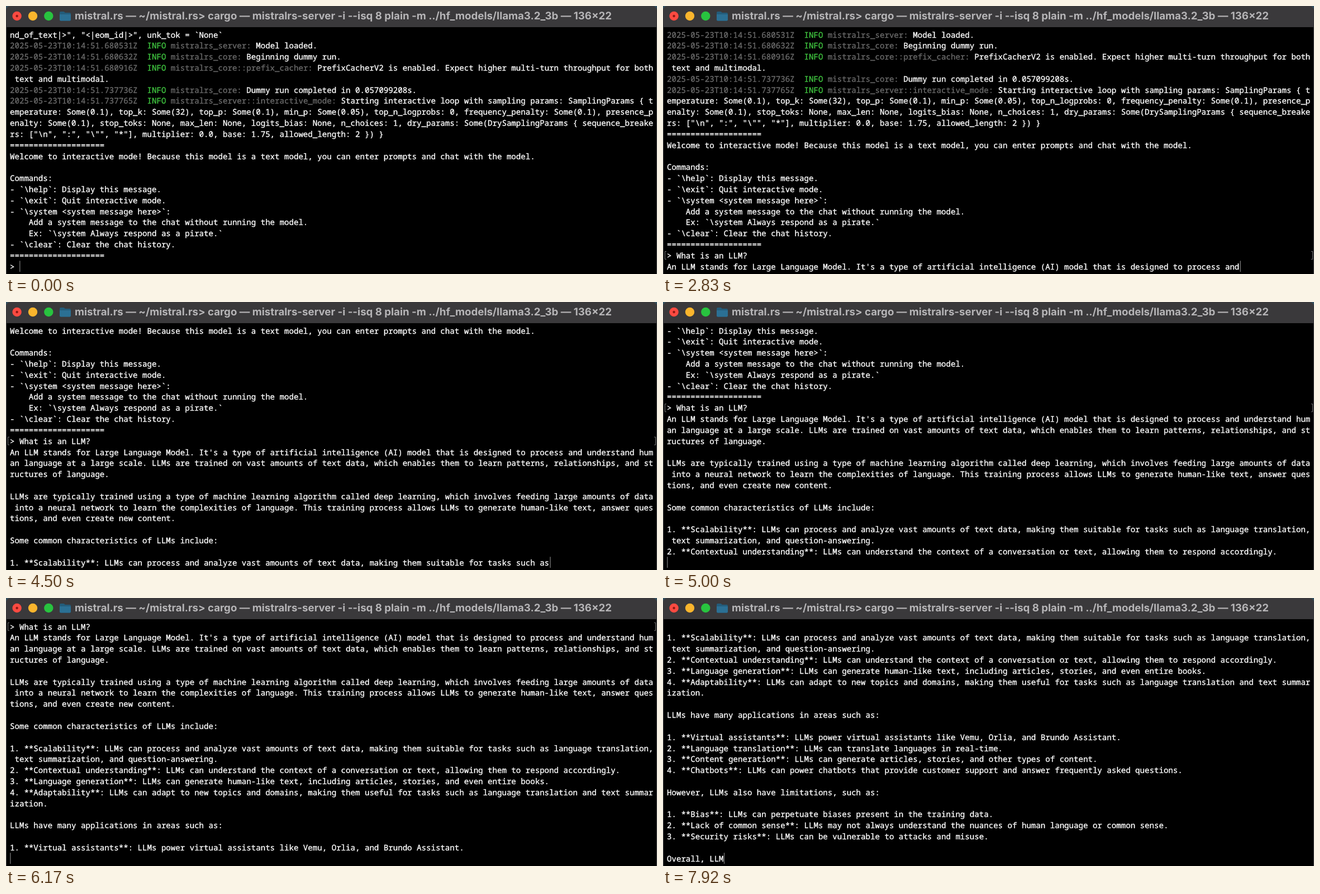
An HTML page for the animation above (8 s loop, 1165 by 481 pixels).

```html
<!DOCTYPE html>
<html lang="en">
<head>
<meta charset="utf-8">
<title>Terminal</title>
<style>
html, body { margin: 0; width: 100%; height: 100%; overflow: hidden; background: #000; }
svg { display: block; width: 1165px; height: 481px; }
text { white-space: pre; text-rendering: geometricPrecision; }
#title { font: 700 18px Inter, sans-serif; fill: #b6b5b7; }
#screen { font: 500 14.125px "Noto Sans Mono", monospace; font-variant-ligatures: none; stroke-width: 0.35px; }
#screen tspan { fill: #fff; stroke: #fff; }
#screen .dim { fill: #6b6b6b; stroke: #6b6b6b; }
#screen .info { fill: #3fc23f; stroke: #3fc23f; }
</style>
</head>
<body>
<svg viewBox="0 0 1165 481" xmlns="http://www.w3.org/2000/svg">
  <rect width="1165" height="481" fill="#33505f"/>
  <rect width="1165" height="500" rx="9" fill="#48484a"/>
  <path d="M1 38H1164V481H1Z"/>
  <path d="M0 38V9Q0 0 9 0H1156Q1165 0 1165 9V38Z" fill="#3a393b"/>
  <circle cx="19.600" cy="18" r="8.200" fill="#fc4a41"/>
  <circle cx="19.600" cy="18" r="2.200" fill="#8c1a14"/>
  <circle cx="48" cy="18" r="8.200" fill="#fab52d"/>
  <circle cx="76.300" cy="18" r="8.200" fill="#28c33f"/>
  <path d="M96 12q0-2 2-2h5.500l2.500 2h8q2 0 2 2v10.500q0 2-2 2h-16q-2 0-2-2z" fill="#235c7a"/>
  <path d="M96 15h20v9.500q0 2-2 2h-16q-2 0-2-2z" fill="#2b7094"/>
  <text id="title" x="123" y="24">mistral.rs — ~/mistral.rs&gt; cargo — mistralrs-server -i --isq 8 plain -m ../hf_models/llama3.2_3b — 136×22</text>
  <g id="screen"></g>
  <path id="marks" d="M6 -7H3.500V7H6M1160 -7H1162.500V7H1160" fill="none" stroke="#777"/>
  <rect id="cursor" width="1.300" height="19.800" fill="#777"/>
</svg>

<script type="text/plain" id="log">
nd_of_text|>", "<|eom_id|>", unk_tok = `None`
2025-05-23T10:14:51.680531Z  INFO mistralrs_server: Model loaded.
2025-05-23T10:14:51.680632Z  INFO mistralrs_core: Beginning dummy run.
2025-05-23T10:14:51.680916Z  INFO mistralrs_core::prefix_cacher: PrefixCacherV2 is enabled. Expect higher multi-turn throughput for both text and multimodal.
2025-05-23T10:14:51.737736Z  INFO mistralrs_core: Dummy run completed in 0.057099208s.
2025-05-23T10:14:51.737765Z  INFO mistralrs_server::interactive_mode: Starting interactive loop with sampling params: SamplingParams { temperature: Some(0.1), top_k: Some(32), top_p: Some(0.1), min_p: Some(0.05), top_n_logprobs: 0, frequency_penalty: Some(0.1), presence_penalty: Some(0.1), stop_toks: None, max_len: None, logits_bias: None, n_choices: 1, dry_params: Some(DrySamplingParams { sequence_breakers: ["\n", ":", "\"", "*"], multiplier: 0.0, base: 1.75, allowed_length: 2 }) }
====================
Welcome to interactive mode! Because this model is a text model, you can enter prompts and chat with the model.

Commands:
- `\help`: Display this message.
- `\exit`: Quit interactive mode.
- `\system <system message here>`:
    Add a system message to the chat without running the model.
    Ex: `\system Always respond as a pirate.`
- `\clear`: Clear the chat history.
====================
</script>

<script type="text/plain" id="reply">
An LLM stands for Large Language Model. It's a type of artificial intelligence (AI) model that is designed to process and understand human language at a large scale. LLMs are trained on vast amounts of text data, which enables them to learn patterns, relationships, and structures of language.

LLMs are typically trained using a type of machine learning algorithm called deep learning, which involves feeding large amounts of data into a neural network to learn the complexities of language. This training process allows LLMs to generate human-like text, answer questions, and even create new content.

Some common characteristics of LLMs include:

1. **Scalability**: LLMs can process and analyze vast amounts of text data, making them suitable for tasks such as language translation, text summarization, and question-answering.
2. **Contextual understanding**: LLMs can understand the context of a conversation or text, allowing them to respond accordingly.
3. **Language generation**: LLMs can generate human-like text, including articles, stories, and even entire books.
4. **Adaptability**: LLMs can adapt to new topics and domains, making them useful for tasks such as language translation and text summarization.

LLMs have many applications in areas such as:

1. **Virtual assistants**: LLMs power virtual assistants like Vemu, Orlia, and Brundo Assistant.
2. **Language translation**: LLMs can translate languages in real-time.
3. **Content generation**: LLMs can generate articles, stories, and other types of content.
4. **Chatbots**: LLMs can power chatbots that provide customer support and answer frequently asked questions.

However, LLMs also have limitations, such as:

1. **Bias**: LLMs can perpetuate biases present in the training data.
2. **Lack of common sense**: LLMs may not always understand the nuances of human language or common sense.
3. **Security risks**: LLMs can be vulnerable to attacks and misuse.

Overall, LLMs are
</script>

<script>
const LOOP = 8000, FPS = 12, COLS = 136, ROWS = 22;
const CHAR = 8.475, LINE = 19.81, LEFT = 7, TOP = 41.3, BASE = 15.3;
const $ = id => document.getElementById(id);
const read = id => $(id).textContent.trim();
const make = (tag, parent, attrs) => {
  const el = document.createElementNS('http://www.w3.org/2000/svg', tag);
  for (const k in attrs) el.setAttribute(k, attrs[k]);
  return parent.appendChild(el);
};

const log = read('log') + '\n', reply = read('reply');
const prompt = 'What is an LLM?', ENTER = 2330;
// Moment each prompt character is typed
const keys = [80, 170, 330, 420, 580, 750, 750, 920, 1080, 1170, 1330, 1500, 1670, 1750, 2080];

// The reply arrives token by token; ends[i] is its length after i tokens
const ends = [0];
for (const tok of reply.match(/ ?LLM| ?\w+| ?[^\w\s]+\n*|\n+| /g)) ends.push(ends.at(-1) + tok.length);
const tokensTo = part => ends.findIndex(n => n >= reply.indexOf(part) + part.length);
const pace = [
  [2460, 0],
  [3580, tokensTo('feeding large')],
  [4500, tokensTo('suitable for tasks such as')],
  [5670, tokensTo('useful for tasks such as language translation')],
  [6170, tokensTo('Assistant.\n')],
  [7920, tokensTo('Overall, LLM')],
  [8000, ends.length - 1]
];

function replyAt(t) {
  if (t < pace[0][0]) return '';
  let i = 1;
  while (i < pace.length - 1 && t >= pace[i][0]) i++;
  const [t0, n0] = pace[i - 1], [t1, n1] = pace[i];
  const n = Math.floor(n0 + (n1 - n0) * Math.min(1, (t - t0) / (t1 - t0)) + 1e-6);
  return reply.slice(0, ends[n]);
}

const lines = Array.from({ length: ROWS }, (_, i) => {
  const line = make('text', $('screen'), { x: LEFT, y: TOP + i * LINE + BASE });
  return ['dim', 'info', 'dim', ''].map(c => make('tspan', line, { class: c }));
});

const wrap = text => text.split('\n').flatMap(s => s.match(/.{1,136}/g) || ['']);

function draw(t) {
  const typed = keys.filter(k => k <= t).length;
  const sent = t >= ENTER;
  const text = log + '> ' + prompt.slice(0, typed) + (sent ? '\n' + replyAt(t) : '');
  const rows = wrap(text).slice(-ROWS);
  rows.forEach((row, i) => {
    const m = row.match(/^(\d{4}-\S+  )(INFO )(\S+: )(.*)$/);
    const parts = m ? m.slice(1) : ['', '', '', row];
    lines[i].forEach((span, j) => { span.textContent = parts[j]; });
  });
  const asked = rows.findIndex(r => r.startsWith('> '));
  $('marks').setAttribute('visibility', sent && asked >= 0 ? 'visible' : 'hidden');
  $('marks').setAttribute('transform', `translate(0 ${TOP + asked * LINE + 10})`);
  const col = Math.min(rows.at(-1).length, COLS - 1);
  $('cursor').setAttribute('x', LEFT + col * CHAR + 0.2);
  $('cursor').setAttribute('y', TOP + (ROWS - 1) * LINE);
}

const title = $('title');
title.style.fontSize = 18 * 962 / title.getComputedTextLength() + 'px';

const start = performance.now();
function tick() {
  const t = (performance.now() - start) % LOOP;
  const step = Math.floor(t * FPS / 1000 + 0.06);
  draw(Math.floor(step * 1000 / FPS / 10 + 0.5) * 10);
  requestAnimationFrame(tick);
}
draw(0);
tick();
</script>
</body>
</html>
```
